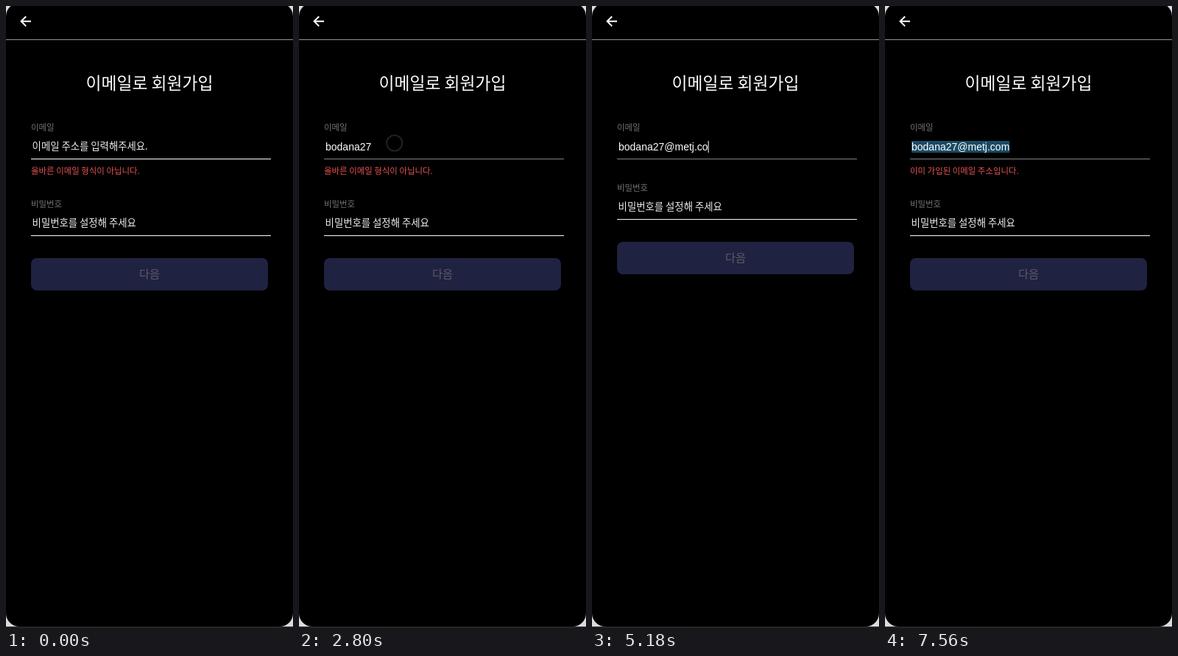
An HTML page with a canvas for the animation above (8 s loop, 390 by 844 pixels).

```html
<!DOCTYPE html>
<html lang="ko">
<head>
<meta charset="utf-8">
<title>회원가입</title>
<style>
  html, body { margin: 0; width: 100%; height: 100%; overflow: hidden; background: #000; }
  canvas { display: block; width: 390px; height: 844px; }
</style>
</head>
<body>
<canvas id="stage"></canvas>
<script>
const W = 390, H = 844, LOOP = 8000, TICK = 70;
const canvas = document.getElementById('stage');
const ctx = canvas.getContext('2d');
const dpr = window.devicePixelRatio || 1;
canvas.width = W * dpr;
canvas.height = H * dpr;

const KR = '"Noto Sans CJK KR", "Noto Sans KR", "Noto Sans CJK JP", "Noto Sans CJK", sans-serif';
const LATIN = '14px "Liberation Sans", Arial, sans-serif';
const EMAIL = 'bodana27@metj.com';

// [time, characters entered]
const KEYS = [[2240, 8], [3220, 9], [4060, 10], [4340, 11], [4480, 12], [4690, 13],
              [4900, 14], [5110, 15], [5180, 16], [5250, 17]];
// [caret on, caret off]
const EMAIL_CARET = [[1540, 2030], [2240, 2800], [3220, 3780], [4060, 5740]];
const PASS_CARET = [[6090, 6580], [7140, 7560]];

const within = (t, spans) => spans.some(([a, b]) => t >= a && t < b);

function rect(x, y, w, h, color) {
  ctx.fillStyle = color;
  ctx.fillRect(x, y, w, h);
}

function rounded(x, y, w, h, r, color) {
  ctx.fillStyle = color;
  ctx.beginPath();
  ctx.roundRect(x, y, w, h, r);
  ctx.fill();
}

function text(str, x, y, font, color, align = 'left') {
  ctx.font = font;
  ctx.fillStyle = color;
  ctx.textAlign = align;
  ctx.fillText(str, x, y);
}

const korean = (str, x, y, size, color, align, weight = 400) =>
  text(str, x, y, `${weight} ${size}px ${KR}`, color, align);

const underline = (y, focused) => rect(34, y, 326, 1.15, focused ? '#777' : '#e6e6e6');
const caret = (x, y) => rect(x, y, 1, 16, '#fff');

function drawScreen() {
  rect(0, 0, W, H, '#dcdcdc');
  rect(0, 842, W, 2, '#2b2328');
  rounded(0, -4, W, 846, 18, '#000');
  rect(0, 45, W, 1.2, '#858585');

  ctx.strokeStyle = '#fff';
  ctx.lineWidth = 2;
  ctx.beginPath();
  ctx.moveTo(34, 20.8);
  ctx.lineTo(21, 20.8);
  ctx.moveTo(27.2, 14.2);
  ctx.lineTo(20.6, 20.8);
  ctx.lineTo(27.2, 27.4);
  ctx.stroke();

  korean('이메일로 회원가입', 195, 112.6, 22.8, '#fff', 'center');
}

function drawEmail(t, focused) {
  const key = KEYS.filter(k => k[0] <= t).pop();
  const value = EMAIL.slice(0, key ? key[1] : 0);
  ctx.font = LATIN;
  const width = ctx.measureText(value).width;

  korean('이메일', 34, 169.4, 11.45, '#717171');
  if (t >= 7560) rect(36, 183, width, 16, '#1a4a64');
  if (value) text(value, 36, 195.5, LATIN, '#fff');
  else korean('이메일 주소를 입력해주세요.', 35.6, 195.3, 13.36, '#eee');
  underline(207, focused);
  if (within(t, EMAIL_CARET)) caret(36 + width, 183);
}

function drawPassword(t, focused, dy) {
  korean('비밀번호', 34, 273.4 + dy, 11.45, '#717171');
  korean('비밀번호를 설정해 주세요', 35.6, 299.3 + dy, 13.36, '#eee');
  underline(311 + dy, focused);
  if (within(t, PASS_CARET)) caret(36, 287 + (t < 6300 ? -22 : 0));
  rounded(34, 342 + dy, 322, 44, 8, '#202242');
  korean('다음', 195, 369.2 + dy, 15.3, '#5c5c62', 'center', 500);
}

function ring(x, y, r, alpha) {
  ctx.globalAlpha = alpha;
  ctx.beginPath();
  ctx.arc(x, y, r, 0, Math.PI * 2);
  ctx.fillStyle = 'rgba(0,0,0,.45)';
  ctx.fill();
  ctx.strokeStyle = '#777';
  ctx.lineWidth = 1.8;
  ctx.stroke();
  ctx.globalAlpha = 1;
}

function drawPointer(t) {
  if (t < 1050 || t >= 3220) return;
  const step = Math.floor((t - 1050) / TICK);
  const rest = step > 5 ? 0 : Math.pow(0.279, step);
  const x = 129.7 + 238 * rest, y = 186 + 38 * rest;
  if (t >= 1540 && t < 1610) ring(x, y, 23, 0.25);
  ring(x, y, 10.6, t < 2800 ? 1 : 0.3);
}

function draw(t) {
  ctx.setTransform(dpr, 0, 0, dpr, 0, 0);
  const valid = t >= 5180 && t < 6300;
  const emailFocus = (t >= 1540 && t < 6090) || t >= 7560;
  const passFocus = t >= 6090 && t < 7560;

  drawScreen();
  drawEmail(t, emailFocus);
  if (!valid) {
    const error = t < 5180 ? '올바른 이메일 형식이 아닙니다.' : '이미 가입된 이메일 주소입니다.';
    korean(error, 34, 227.8, 11.45, '#e65252');
  }
  drawPassword(t, passFocus, valid ? -22 : 0);
  drawPointer(t);
}

const start = performance.now();
function frame() {
  draw((performance.now() - start) % LOOP);
  requestAnimationFrame(frame);
}
frame();
</script>
</body>
</html>
```
